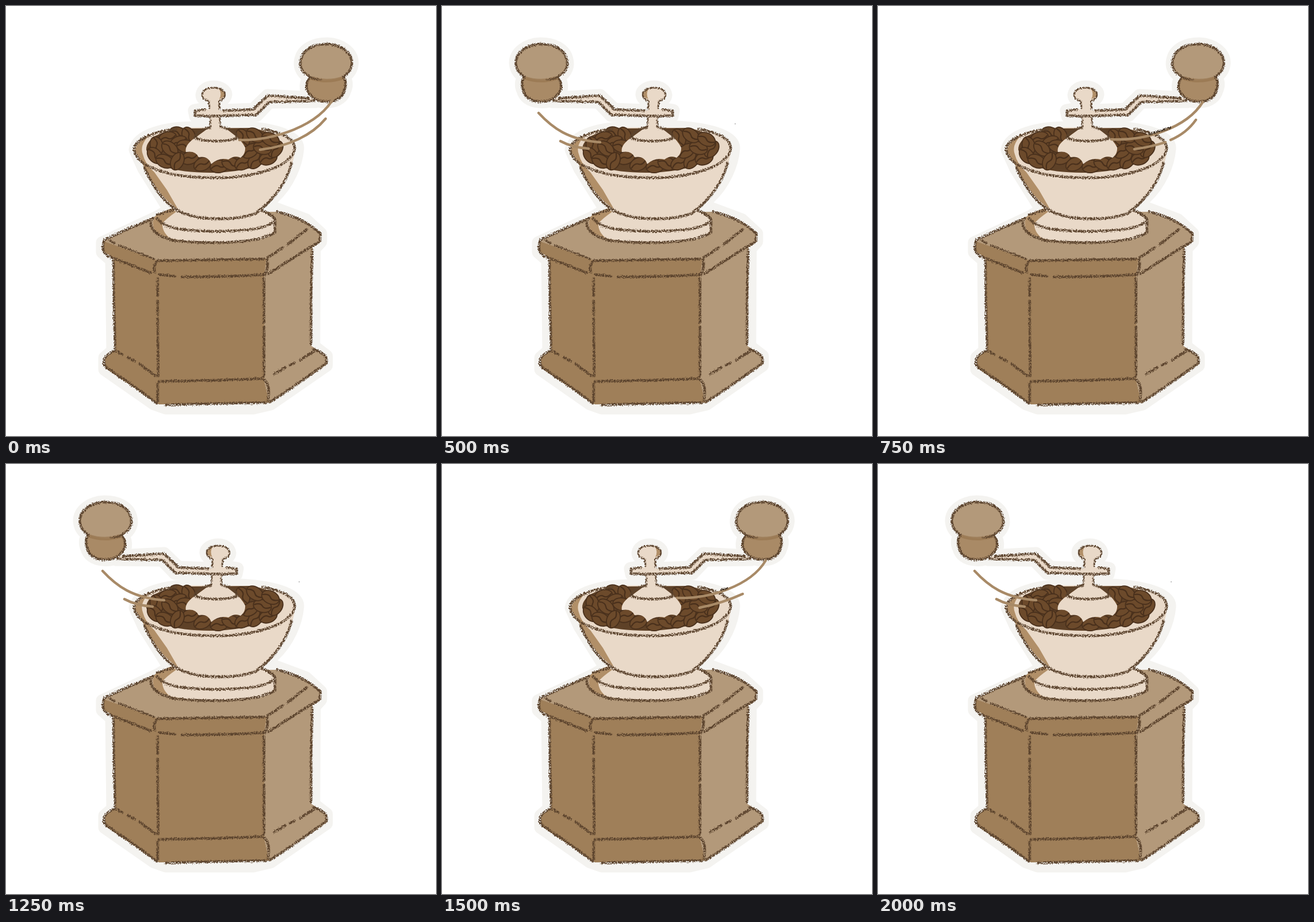
Recreate the animation shown at these times as an HTML page. Size 748 by 748 pixels, loop 2.25 s.

```html
<!DOCTYPE html>
<html lang="en">
<head>
<meta charset="utf-8">
<title>Coffee grinder</title>
<style>
  html, body { margin: 0; width: 100%; height: 100%; overflow: hidden; background: #fff; }
  svg { display: block; width: 100vw; height: 100vh; }
  path { stroke-linecap: round; stroke-linejoin: round; }
  .halo { fill: #f4f3f0; stroke: #f4f3f0; stroke-width: 23; stroke-linejoin: round; }
  .line { fill: none; stroke: #5b432d; stroke-width: 4.6; filter: url(#crayon); }
  .thin { stroke-width: 3.2; }
  .light { fill: #b3997a; }
  .dark { fill: #9f7f59; }
  .cream { fill: #e9d9c8; }
  .shade { fill: #b18f68; }
  .swoosh { fill: none; stroke: #a88a67; stroke-width: 4.4; }
  .ink { stroke: #3c2d20; stroke-width: 4; }
  .bean { fill: #6c4a2b; stroke: #49301c; stroke-width: 1.8; }
  .seam { fill: none; stroke: #49301c; stroke-width: 2.2; }
  .pose { opacity: 0; }
</style>
</head>
<body>
<svg viewBox="0 0 748 748">
  <defs>
    <filter id="crayon" filterUnits="userSpaceOnUse" x="0" y="0" width="748" height="748" color-interpolation-filters="sRGB">
      <feTurbulence type="fractalNoise" baseFrequency=".45" numOctaves="2" seed="4" result="n"/>
      <feDisplacementMap in="SourceGraphic" in2="n" scale="5" xChannelSelector="R" yChannelSelector="G" result="d"/>
      <feColorMatrix in="n" values="0 0 0 0 0  0 0 0 0 0  0 0 0 0 0  5 0 0 0 -1.55" result="grain"/>
      <feComposite in="d" in2="grain" operator="in"/>
    </filter>

    <path id="knobTop" d="M526 123C514 115 510 104 513 93C517 75 536 66 559 66C583 67 602 81 602 99C601 112 594 119 586 123C566 132 540 131 526 123Z"/>
    <path id="knobLow" d="M530 122C520 132 520 146 528 154C536 164 549 168 562 166C578 165 587 156 589 147C593 139 592 130 587 122Z"/>
    <path id="arm" d="M328 182L345 179L375 182L430 180L455 156L532 160L538 166L458 167L436 190L330 192Z"/>
    <path id="post" d="M353 166C347 163 341 161 341 155C342 146 351 141 361 141C373 141 382 147 382 154C381 161 376 163 371 166L372 213L356 213Z"/>

    <g id="knob">
      <use href="#knobLow" fill="#a98a66"/>
      <use href="#knobTop" class="light"/>
      <path d="M533 126Q560 134 586 125" fill="none" stroke="#97764f" stroke-width="6" opacity=".7"/>
      <g class="line">
        <path d="M526 121C514 115 510 104 513 93C517 75 536 66 559 66C583 67 602 81 602 99C601 112 594 118 587 123"/>
        <path d="M529 124C520 134 521 146 529 154C537 164 549 167 562 166C578 165 586 157 589 147C592 139 592 131 588 124"/>
        <path class="thin" d="M528 123Q539 128 548 128"/>
      </g>
    </g>
    <g id="stem">
      <use href="#post" class="cream"/>
      <path class="shade" d="M371 145Q383 149 379 158L371 162Q376 153 371 145Z"/>
      <g class="line thin">
        <path d="M351 165C345 163 341 160 341 154C343 146 351 142 361 142C373 142 382 148 381 155C380 161 376 163 371 166"/>
        <path d="M353 167L354 178M371 167L372 180M356 196L356 210M372 196L373 210"/>
      </g>
    </g>
    <g id="crank">
      <use href="#stem"/>
      <use href="#arm" class="cream"/>
      <g class="line">
        <path d="M346 180L329 182L329 191L347 191"/>
        <path d="M349 192L436 189L458 167L536 165M378 182L430 180L455 156L526 160"/>
      </g>
      <use href="#knob"/>
    </g>
    <g id="crankHalo" class="halo">
      <use href="#post"/><use href="#arm"/><use href="#knobTop"/><use href="#knobLow"/>
    </g>
  </defs>

  <g class="pose" data-on="right"><use href="#crankHalo"/></g>
  <g class="pose" data-on="left"><use href="#crankHalo" transform="matrix(-1 0 0 1 730 0)"/></g>
  <g class="pose" data-on="front"><use href="#post" class="halo"/></g>

  <g class="halo">
    <path d="M168 412L262 368L290 352L470 353L521 372L547 396L547 410L536 422L535 592L557 609L557 625L460 692L430 699L278 699L258 692L172 632L172 612L186 600L184 442L168 428Z"/>
    <path d="M225 250C230 225 275 212 330 212L410 211C475 215 508 230 507 248C505 275 490 310 466 332L440 362L285 355L240 283Z"/>
  </g>

  <!-- box -->
  <path class="light" d="M170 409L272 360L470 358L520 375L547 394L453 442L262 444Z"/>
  <path class="dark" d="M170 409L262 442L453 440L449 650L458 690L266 693L173 630L172 611L190 598L187 438L169 427Z"/>
  <path class="light" d="M453 440L547 393L547 410L533 420L531 591L558 610L557 624L458 691L449 650L449 468Z"/>
  <g class="line">
    <path d="M288 359C245 372 205 391 171 407C167 418 167 427 177 435L252 464"/>
    <path d="M472 358C503 365 527 377 547 396L546 410L532 418L456 466"/>
    <path d="M264 443L449 440M262 445Q256 453 259 463M267 467L294 470M306 471Q380 472 448 467"/>
    <path d="M454 441Q458 452 450 468M455 438L482 420M490 415L523 389"/>
    <path d="M187 444L188 520L190 598M533 424L531 500L531 588"/>
    <path d="M264 474L264 504M264 513L264 537M264 544L265 644M449 474L449 551M449 558L449 644"/>
    <path d="M189 600C170 607 166 620 175 629L226 664L262 691M278 694Q370 691 453 690"/>
    <path d="M535 597C549 602 562 609 557 622C530 641 492 669 459 689"/>
    <path d="M193 601L202 606M213 612L224 618M233 623L260 643M266 653Q355 652 446 648M264 656L264 688M450 651Q460 658 456 686"/>
    <path d="M467 640L486 629M494 625L502 621M511 616L537 600"/>
    <path class="thin" d="M181 408L190 413M196 416L258 440"/>
  </g>

  <!-- pedestal and bowl -->
  <path class="cream" d="M290 350L262 363C252 374 253 392 268 399C300 411 370 415 440 406C465 402 469 392 469 370L438 352Z"/>
  <path class="shade" d="M288 353L262 363C252 374 254 390 267 398L285 404Q271 392 272 378Q280 369 296 358Z"/>
  <path class="cream" d="M222 251C226 228 260 214 310 211L420 212C472 216 503 229 503 247C501 285 474 333 436 361C405 373 340 373 310 362C275 345 255 310 240 278Z"/>
  <path class="shade" d="M224 252C227 240 236 231 248 226Q232 243 238 258Q242 275 258 289L280 320L299 353C272 336 252 304 240 279Z"/>
  <path d="M244 250C244 228 275 213 325 213L425 212C462 218 479 230 479 246C472 270 430 289 355 290C290 290 251 276 244 250Z" fill="#5e4127"/>
  <g id="beans"></g>
  <path class="cream" d="M328 230C316 238 311 247 313 254Q330 251 335 263Q352 260 357 275Q370 263 387 267Q398 259 408 264Q417 257 416 246Q410 235 403 229L380 211L354 211Z"/>
  <g class="line">
    <path d="M329 229Q335 214 357 211M373 210Q397 214 402 227M328 229C345 237 386 237 404 229"/>
    <path d="M223 249C224 232 258 218 296 214M447 214C483 220 505 233 502 250C496 279 433 299 365 299C292 299 228 283 223 250"/>
    <path d="M241 281C257 318 276 345 307 360C344 374 400 373 434 361C465 339 488 308 497 273"/>
    <path d="M292 354L263 363M441 354Q460 361 468 370M263 369C274 386 302 391 365 392C420 391 454 388 468 373L468 393M252 378C253 392 266 401 289 407C335 414 406 413 443 404Q461 399 468 394"/>
  </g>

  <!-- crank poses -->
  <g class="pose" data-on="right"><use href="#crank"/></g>
  <g class="pose" data-on="left">
    <use href="#crank" transform="matrix(-1 0 0 1 730 0)"/>
    <path class="swoosh" d="M168 186C192 212 220 233 275 237M206 235Q226 246 255 248"/>
    <circle cx="510" cy="205" r=".8" fill="#777"/>
  </g>
  <g class="pose" data-on="front">
    <use href="#stem"/>
    <path class="cream" d="M350 181L380 181L395 244L377 246Z"/>
    <path class="line" d="M350 182L379 181L394 242M350 182L376 244"/>
    <use href="#knob" transform="translate(-172 93)"/>
  </g>

  <g class="swoosh">
    <g class="pose" data-on="a">
      <path d="M406 233C465 235 545 208 571 158M442 250C492 244 532 225 556 196"/>
    </g>
    <g class="pose" data-on="b">
      <path d="M406 232C465 235 537 212 565 167M446 249Q475 245 500 237M509 233Q537 221 553 198"/>
      <path class="line ink" d="M472 223L508 212"/>
    </g>
    <g class="pose" data-on="c">
      <path d="M409 233C465 235 537 212 563 168M448 250Q488 242 523 226"/>
      <path class="line ink" d="M486 219L496 216"/>
    </g>
  </g>
</svg>
<script>
  // x, y, tilt in degrees
  const beans = [
    [300, 222, 20], [281, 230, -15], [318, 226, 65], [262, 243, 75], [300, 238, -25],
    [285, 248, 40], [259, 260, 50], [313, 244, 10], [276, 270, 25], [320, 264, -20],
    [298, 270, -65], [342, 275, -25], [371, 279, -10], [391, 274, 20], [413, 273, -30],
    [434, 269, -50], [456, 265, -20], [425, 252, -35], [469, 249, -55], [446, 247, 15],
    [412, 229, 65], [433, 225, 35], [460, 232, 25]
  ];
  document.getElementById('beans').innerHTML = beans.map(([x, y, tilt]) =>
    `<g transform="translate(${x} ${y}) rotate(${tilt})">
      <ellipse class="bean" rx="16" ry="11"/>
      <path class="seam" d="M-14 1Q-5 -5 0 0T14 -1"/>
    </g>`).join('');

  const steps = ['right a', 'front', 'left', 'right b', 'front', 'left', 'right c', 'front', 'left'];
  const stepMs = 250;

  for (const el of document.querySelectorAll('.pose')) {
    const frames = steps.map((step, i) => ({
      opacity: step.split(' ').includes(el.dataset.on) ? 1 : 0,
      offset: i / steps.length,
      easing: 'steps(1, end)'
    }));
    frames.push({ opacity: frames[0].opacity, offset: 1 });
    const run = el.animate(frames, { duration: steps.length * stepMs, iterations: Infinity });
    run.startTime = 0;
  }
</script>
</body>
</html>
```
